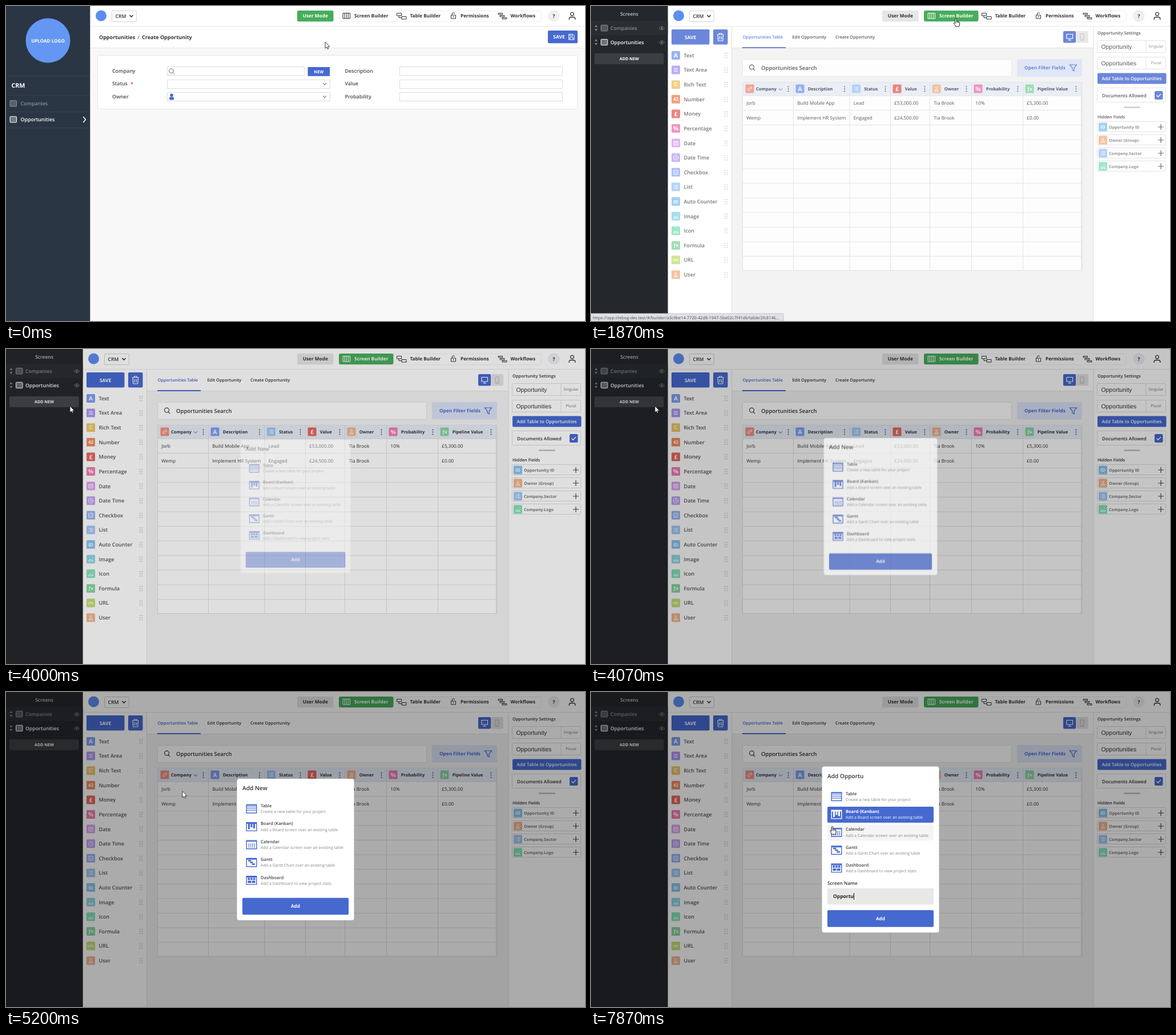
Recreate the animation shown at these times as an HTML page. Size 1014 by 552 pixels, loop 8000 ms.

```html
<!DOCTYPE html>
<html lang="en">
<head>
<meta charset="utf-8">
<title>Screen builder</title>
<style>
html, body { margin: 0; width: 100%; height: 100%; overflow: hidden; background: #f8f8f8; }
svg { display: block; width: 100vw; height: 100vh; }
text { font-family: "Open Sans", "Noto Sans", sans-serif; white-space: pre; text-rendering: geometricPrecision; }
.arial { font-family: "Liberation Sans", Arial, sans-serif; }

.cursor { animation: move 8s ease-in-out infinite; }
.arrow { animation: arrow 8s step-end infinite; }
.hand { animation: hand 8s step-end infinite; }
.grab { animation: grab 8s step-end infinite; }
.nav-hover { animation: nav-hover 8s step-end infinite; }
.status { animation: status 8s linear infinite; }
.builder { animation: builder 8s step-end infinite; }
.work { animation: work 8s ease-out infinite; }
.text-hover { animation: text-hover 8s step-end infinite; }
.add-hover { animation: add-hover 8s linear infinite; }
.dim { animation: dim 8s linear infinite; }
.pick { animation: pick 8s step-end infinite; }
.pop { animation: pop 8s linear infinite; transform-origin: 507px 276px; }
.named { animation: named 8s step-end infinite; }
.board-hover { animation: board-hover 8s step-end infinite; }
.calendar-hover { animation: calendar-hover 8s step-end infinite; }

@keyframes move {
  0%, 2.54% { transform: translate(559px, 63px); }
  13.375%, 27.5% { transform: translate(639px, 22px); }
  35%, 37.5% { transform: translate(203px, 74px); animation-timing-function: linear; }
  38.375% { transform: translate(192.5px, 74.4px); animation-timing-function: ease-out; }
  44.125%, 60% { transform: translate(112px, 100px); }
  69.125%, 78.3% { transform: translate(449px, 226px); }
  80.875%, 100% { transform: translate(422.5px, 235.5px); }
}
@keyframes arrow {
  0% { opacity: 1; } 10.9% { opacity: 0; } 30% { opacity: 1; } 34% { opacity: 0; }
  48.375% { opacity: 1; } 67.1%, 100% { opacity: 0; }
}
@keyframes hand {
  0% { opacity: 0; } 10.9% { opacity: 1; } 30% { opacity: 0; } 41% { opacity: 1; }
  48.375% { opacity: 0; } 67.1%, 100% { opacity: 1; }
}
@keyframes grab { 0% { opacity: 0; } 34% { opacity: 1; } 41%, 100% { opacity: 0; } }
@keyframes nav-hover { 0% { opacity: 0; } 10.9% { opacity: 1; } 20.875%, 100% { opacity: 0; } }
@keyframes status { 0%, 11.2% { opacity: 0; } 12%, 31% { opacity: 1; } 33%, 100% { opacity: 0; } }
@keyframes builder { 0% { opacity: 0; } 20.875%, 100% { opacity: 1; } }
@keyframes work { 0%, 20.8% { opacity: 0; } 25%, 100% { opacity: 1; } }
@keyframes text-hover { 0% { opacity: 0; } 34% { opacity: 1; } 40.8%, 100% { opacity: 0; } }
@keyframes add-hover { 0%, 41% { opacity: 0; } 42.5%, 48.3% { opacity: 1; } 52.5%, 100% { opacity: 0; } }
@keyframes dim { 0%, 47.9% { opacity: 0; } 50% { opacity: .38; } 51.625% { opacity: .94; } 52.5%, 100% { opacity: 1; } }
@keyframes pop {
  0%, 47.9% { opacity: 0; transform: scale(.9); }
  50% { opacity: .38; transform: scale(.938); }
  51.625% { opacity: .95; transform: scale(.994); }
  52.5%, 100% { opacity: 1; transform: scale(1); }
}
@keyframes pick { 0% { opacity: 1; } 76.625%, 100% { opacity: 0; } }
@keyframes named { 0% { opacity: 0; } 76.625%, 100% { opacity: 1; } }
@keyframes board-hover { 0% { opacity: 0; } 67.5%, 100% { opacity: 1; } }
@keyframes calendar-hover { 0% { opacity: 0; } 80%, 100% { opacity: 1; } }
</style>
</head>
<body>
<svg id="stage" viewBox="0 0 1014 552"></svg>
<script>
const BLUE = '#4669d0', GREEN = '#47ad5c', INK = '#333', LINE = '#dcdcdc';

const rect = (x, y, w, h, fill, more = '') =>
  `<rect x="${x}" y="${y}" width="${w}" height="${h}" fill="${fill}" ${more}/>`;
// outlined box, snapped so that its one pixel border stays crisp
const frame = (x, y, w, h, r = 1, stroke = LINE) =>
  rect(Math.floor(x) + .5, Math.floor(y) + .5, Math.round(w), Math.round(h), '#fff', `rx="${r}" stroke="${stroke}"`);
const path = (d, stroke = INK, width = 1, fill = 'none', more = '') =>
  `<path d="${d}" stroke="${stroke}" stroke-width="${width}" fill="${fill}" ${more}/>`;
const dot = (x, y, r, fill) => `<circle cx="${x}" cy="${y}" r="${r}" fill="${fill}"/>`;
// y is the middle of the capitals
const text = (x, y, s, size, weight = 600, fill = INK, more = '') =>
  `<text x="${x}" y="${(y + size * .36).toFixed(2)}" font-size="${size}" font-weight="${weight}" fill="${fill}" ${more}>${s}</text>`;
const mid = 'text-anchor="middle"';
const at = (x, y, body) => `<g transform="translate(${x} ${y})">${body}</g>`;
const group = (cls, body) => `<g class="${cls}">${body}</g>`;
const button = (x, y, w, h, fill = BLUE) => rect(x, y, w, h, fill, 'rx="2"');
const chevron = (x, y, c = INK, w = 1.5) => path(`M${x - 3} ${y - 1.6}l3 3.2l3 -3.2`, c, w);
const lens = (x, y, r, c, w) => path(`M${x + r} ${y}a${r} ${r} 0 1 0 -.01 .1M${x + r * .7} ${y + r * .7}l3 3`, c, w);

/* ---- top bar, shared by both screens ---- */
function topBar(left, dx, building) {
  const tool = building ? '#fff' : INK;
  return rect(left, 0, 1014 - left, 35, '#fff') + rect(left, 35, 1014 - left, 1, '#e6e6e6')
    + dot(166.5 + dx, 17, 9.5, '#5c8df0')
    + frame(185.5 + dx, 8, 43, 19, 2, '#d2d2d2') + text(191.5 + dx, 18, 'CRM', 8.6) + chevron(219.5 + dx, 17.5)
    + rect(510, 8, 63.5, 19.2, building ? '#e6e6e6' : GREEN, 'rx="2.5"')
    + text(541.8, 17.4, 'User Mode', 8.24, 700, building ? INK : '#fff', mid)
    + frame(583, 8, 354, 19, 3, '#efefef')
    + (building ? rect(583, 8, 95.5, 19, GREEN, 'rx="3"') : group('nav-hover', rect(583, 8, 95.5, 19, '#e9e9e9', 'rx="3"')))
    + path('M590 12.5H602.5V22H590ZM593 12.5V22M596.2 12.5V22M599.4 12.5V22', tool)
    + text(610, 17.3, 'Screen Builder', 8.24, 700, tool)
    + path('M684.5 12.5H692.5V17H684.5ZM693 18.5H701V23H693ZM688 17V20.5H693', INK)
    + text(707.5, 17.3, 'Table Builder', 8.24, 700)
    + path('M779.5 16H787.5V22H779.5ZM781.3 16V13.8Q781.3 11.8 783.5 11.8T785.7 13.5M783.5 18V20', INK)
    + text(796, 17.3, 'Permissions', 8.24, 700)
    + path('M862 12.5H869.5V14.8H862ZM865 16.5H873V18.8H865ZM869 20.5H877V22.8H869Z', INK)
    + text(883.5, 17.3, 'Workflows', 8.24, 700)
    + dot(959.5, 17.3, 9.7, '#e1e3ec') + dot(959.5, 17.3, 8.9, '#eff0f6') + text(959.5, 17.4, '?', 9, 700, INK, mid)
    + path('M991.5 11.2a2.9 2.9 0 1 1 -.1 0ZM986.3 24V22.5Q986.3 19.5 989 19.5H994Q996.8 19.5 996.8 22.5V24', INK, 1.3);
}

/* ---- record form ---- */
const screenIcon = (x, y, c, fill) => rect(x, y, 11.5, 10.3, fill, `rx="1" stroke="${c}"`);

function formScreen() {
  const field = (x, y, w) => frame(x, y, w, 15, 0);
  const label = (x, y, s) => text(x, y, s, 8.87, 600, '#484848');
  const rows = [106, 129, 151];
  return rect(147, 0, 867, 552, '#f8f8f8')
    + rect(147, 36, 867, 37, '#fff') + rect(147, 73, 867, 1, '#e4e4e4')
    + topBar(147, 0, false)
    + rect(0, 0, 147.3, 552, '#2b3644')
    + dot(73.5, 60.5, 39, '#6397f3') + text(73.5, 61, 'UPLOAD LOGO', 8.1, 700, '#fff', mid)
    + [122, 156, 185, 213].map(y => rect(0, y, 147, .8, '#3a4553')).join('')
    + text(9.5, 139.5, 'CRM', 10.7, 700, '#fff')
    + screenIcon(7, 165.7, '#8b949e', '#55606d') + text(25.5, 171, 'Companies', 8.87, 600, '#8b949e')
    + screenIcon(7, 193.7, '#fff', '#6f7883') + text(25.5, 199, 'Opportunities', 8.87, 600, '#fff')
    + path('M135.3 194l4.2 5l-4.2 5', '#fff', 1.5)
    + text(163, 54.5, 'Opportunities', 9, 700) + text(230.5, 54.5, '/', 9, 400) + text(238, 54.5, 'Create Opportunity', 9, 700)
    + button(949, 43, 52, 22.3) + text(958.3, 54.3, 'SAVE', 8.5, 700, '#fff')
    + path('M985.5 49.5H993L995 51.5V59H985.5ZM987.5 49.5V52.5H992V49.5M987.5 59V55H993V59', '#fff')
    + frame(160, 86, 840, 94, 1, '#e6e6e6')
    + label(186, 113.8, 'Company') + label(186, 136, 'Status') + label(186, 158.4, 'Owner')
    + text(218, 137, '*', 9, 600, '#d33')
    + field(282, rows[0], 240) + field(282, rows[1], 285) + field(282, rows[2], 285)
    + lens(289.3, 114, 3.8, '#555', .9) + rect(528.5, 107, 38.5, 15.8, BLUE) + text(547.8, 115, 'NEW', 7.3, 700, '#fff', mid)
    + chevron(558, 136.7, '#777', 1.1) + chevron(558, 159, '#777', 1.1)
    + dot(290, 156.3, 2.8, BLUE) + rect(286, 159.6, 8, 5, BLUE, 'rx="1.5"')
    + label(593.5, 113.8, 'Description') + label(593.5, 136, 'Value') + label(593.5, 158.4, 'Probability')
    + rows.map(y => field(689, y, 285)).join('');
}

/* ---- builder ---- */
const BARS = 'M4 5H11M4 7.5H11M4 10H11';
const PERSON = 'M7.5 4a1.6 1.6 0 1 1 -.1 0ZM4.3 11.3Q4.3 8.6 7.5 8.6T10.7 11.3Z';
const PICTURE = 'M3.5 11L6 7.5L8 9.5L9.5 8L11.5 11ZM10 5H11';
const KINDS = {
  'Text': ['#7f9ff0', 'A'], 'Text Area': ['#ae97f4', BARS], 'Rich Text': ['#ecc566', 'M4 4.5H11M4 7H8M4 9.5H11'],
  'Number': ['#f08a5c', '42'], 'Money': ['#e8685e', '£'], 'Percentage': ['#f07bb0', '%'],
  'Date': ['#dba0f0', 'M4 4.5H11V11H4ZM4 6.5H11M6 8.8H9'],
  'Date Time': ['#bfa2f4', 'M7.5 3.5a4 4 0 1 1 -.1 0ZM7.5 5V8H9.5'],
  'Checkbox': ['#98b2f5', 'M4 4H11V11H4ZM5.5 7.5L7 9L9.5 6'],
  'List': ['#a2c8f6', 'M4 5H5M6.2 5H11M4 7.5H5M6.2 7.5H11M4 10H5M6.2 10H11'],
  'Auto Counter': ['#88c6f0', 'ID'], 'Image': ['#8dd6e6', PICTURE], 'Icon': ['#84e3ba', PICTURE],
  'Formula': ['#88d6a2', 'ƒx'], 'URL': ['#c5de74', 'URL'], 'User': ['#f2b48c', PERSON],
  'Link': ['#f0907e', 'M6.5 8.5L9 6M6 6L4 8.5Q4 11 6.5 11L8 9.5M7 5.5L8.5 4Q11 4 11 6.5L9.5 8.5']
};
function chip(x, y, kind) {
  const [colour, mark] = KINDS[kind];
  const size = mark.length > 2 ? 5.5 : mark.length > 1 ? 8 : 10;
  return at(x, y, rect(0, 0, 15, 15, colour, 'rx="1.5"')
    + (mark[0] === 'M' ? path(mark, '#fff') : text(7.5, 7.6, mark, size, 700, '#fff', mid)));
}

function screensBar() {
  const row = (y, name, c, fill) =>
    path(`M6.3 ${y - 1.7}h5.2l-2.6 -3.5ZM6.3 ${y + 1.7}h5.2l-2.6 3.5Z`, 'none', 0, '#85878a')
    + screenIcon(17.5, y - 5, c, fill) + text(34, y + .3, name, 8.7, 600, c)
    + path(`M119.5 ${y + .5}q4.5 -6 9 0q-4.5 6 -9 0Z`, '#85878a', .9) + dot(124, y + .5, 1.4, '#85878a');
  return rect(0, 0, 134.5, 552, '#24272b') + rect(0, 26, 134.5, 25, '#2a2d31')
    + text(67, 14, 'Screens', 8.5, 600, '#c4c5c7', mid)
    + row(38.5, 'Companies', '#8b8d90', '#55585c') + row(63.3, 'Opportunities', '#fff', '#707377')
    + button(6, 83, 121.5, 19, '#3b3e42') + group('add-hover', button(6, 83, 121.5, 19, '#4a4c50'))
    + text(67, 92.7, 'ADD NEW', 7.1, 700, '#fff', mid);
}

function fieldPanel() {
  const names = Object.keys(KINDS).slice(0, 16);
  const grip = y => [0, 1, 2].map(r => dot(234.5, y - 3.6 + r * 3.7, 1.1, '#cfcfcf') + dot(238.3, y - 3.6 + r * 3.7, 1.1, '#cfcfcf')).join('');
  return group('text-hover', rect(135, 74, 111, 25, '#f2f2f2'))
    + button(141, 41, 66.5, 26.5) + text(174, 54.6, 'SAVE', 8.4, 700, '#fff', mid)
    + button(214, 41, 25.5, 26.5)
    + path('M221 50H232.5M224.5 50V48H229V50M222 50.5L222.7 61H230.8L231.5 50.5M225.2 53V58.5M228.3 53V58.5', '#fff', 1.2)
    + names.map((name, i) => {
      const y = 86.5 + i * 25.62;
      return chip(141, y - 7.6, name) + text(162.5, y, name, 9.1, 600, '#555') + grip(y);
    }).join('');
}

function dataTable() {
  const cols = [
    [265.5, 'Link', 'Company', 'Jorb', 'Wemp'],
    [354.5, 'Text', 'Description', 'Build Mobile App', 'Implement HR System'],
    [453, 'List', 'Status', 'Lead', 'Engaged'],
    [524.5, 'Money', 'Value', '£53,000.00', '£24,500.00'],
    [593.5, 'User', 'Owner', 'Tia Brook', 'Tia Brook'],
    [666.5, 'Percentage', 'Probability', '10%', ''],
    [756.5, 'Formula', 'Pipeline Value', '£5,300.00', '£0.00']
  ];
  const ends = [...cols.slice(1).map(c => c[0]), 858.5];
  let out = rect(265.5, 133.5, 594.5, 330, '#fff', `stroke="${LINE}"`) + rect(265.5, 133.5, 594.5, 23.5, '#e6ecf8');
  for (let i = 0; i < 12; i++) out += rect(265.5, 156.7 + i * 25.6, 594.5, .9, LINE);
  cols.forEach(([x, kind, name, first, second], i) => {
    const icon = i ? x + 4 : x + 5, dots = ends[i] - 9;
    out += rect(ends[i] - .4, 133.5, .9, 330, LINE) + chip(icon, 137.6, kind)
      + text(i ? x + 25.2 : 289, 145.6, name, 7.6, 700)
      + [141.5, 145.5, 149.5].map(y => dot(dots, y, 1.1, '#555')).join('')
      + text(x + 6.8, 170.3, first, 8.22, 400) + text(x + 6.8, 196, second, 8.22, 400);
  });
  return out + chevron(332, 146, '#555', 1);
}

function settings() {
  const name = (y, s, hint) => frame(886.5, y, 120, 21, 1) + rect(971.5, y, .9, 21.5, LINE)
    + text(893.5, y + 10.8, s, 10.4, 400, INK, 'class="arial"') + text(989.5, y + 11, hint, 6.9, 400, '#777', mid);
  const hidden = [['Auto Counter', 'Opportunity ID'], ['User', 'Owner (Group)'], ['List', 'Company.Sector'], ['Icon', 'Company.Logo']];
  return text(887, 47, 'Opportunity Settings', 7.5) + name(60, 'Opportunity', 'Singular') + name(89, 'Opportunities', 'Plural')
    + button(887, 117.5, 120.5, 19) + text(947, 127.3, 'Add Table to Opportunities', 8.1, 600, '#fff', mid)
    + frame(886.5, 143.5, 120, 25, 1) + text(895, 156.7, 'Documents Allowed', 8.1)
    + button(987, 149, 14.5, 15) + path('M990.5 156.5l2.7 2.8l4.8 -5.2', '#fff', 1.4)
    + rect(933, 176.3, 29, 2.8, '#c4c4c4', 'rx="1.4"') + text(887, 194, 'Hidden Fields', 7.4)
    + hidden.map(([kind, s], i) => {
      const y = 212 + i * 23;
      return frame(886.5, y - 9.3, 120, 18, 1) + chip(889, y - 7.5, kind) + text(907, y + .3, s, 7.1, 700, '#777')
        + path(`M993 ${y}h10M998 ${y - 5}v10`, '#444', 1.2);
    }).join('');
}

function builderScreen() {
  return rect(134.5, 0, 880, 552, '#f3f3f3') + rect(134.5, 35, 111.5, 517, '#fff')
    + rect(246, 35, 634, 38, '#fff') + rect(246, 73, 634, 1, '#e2e2e2') + rect(880, 35, 134, 517, '#fff')
    + rect(246, 35, 1, 517, '#e2e2e2') + rect(879.5, 35, 1, 517, '#e2e2e2')
    + group('work', fieldPanel()
      + text(265.5, 54.2, 'Opportunities Table', 7.4, 600, BLUE) + rect(265, 72, 76, 2, BLUE)
      + text(352.5, 54.2, 'Edit Opportunity', 7.4) + text(428, 54.2, 'Create Opportunity', 7.4)
      + button(827, 44, 22, 20.5) + rect(849, 44, 22, 20.5, '#e4e4e4', 'rx="2"')
      + path('M833 49.5H843.5V57H833ZM838.2 57V59.5M835.5 60H841', '#fff', 1.2)
      + path('M857 49H863V60H857ZM859 58H861', '#b5b5b5', 1)
      + frame(265.5, 93, 471, 30, 1, '#e4e4e4') + lens(281.5, 107.5, 4, INK, 1.1) + text(298, 108.3, 'Opportunities Search', 9.5)
      + button(746, 93, 114, 30.5, '#dbe2f6') + text(759, 108.3, 'Open Filter Fields', 8.24, 700, BLUE)
      + path('M838.5 103H850.5L846 108.5V114L843 112V108.5Z', BLUE, 1.2)
      + dataTable() + settings())
    + topBar(134.5, -13, true) + screensBar();
}

/* ---- dialog ---- */
const ITEMS = [
  ['Table', 'Create a new table for your project', 'M1 5H18M1 8H18M1 11H18', 1],
  ['Board (Kanban)', 'Add a Board screen over an existing table', 'M5 3V12.5M9.5 3V9M14 3V11', 3],
  ['Calendar', 'Add a Calendar screen over an existing table', 'M4 7.2H16M4 9.8H16M4 12.4H16', 1.6, 'stroke-dasharray="1.7 1.6"'],
  ['Gantt', 'Add a Gantt Chart over an existing table', 'M3.5 5H9M7 8H12M10 11H15.5', 2.3],
  ['Dashboard', 'Add a Dashboard to view project stats', 'M3 5.3H6.5M7.7 5.3H11.3M12.5 5.3H16M3 10.7H9M10.2 10.7H16', 4]
];
function dialog(top, height, [title, titleId], hover, hoverClass, chosen) {
  const row = (i, fill) => rect(414, top + 39.2 + i * 31.35, 186, 28, fill, 'rx="2"');
  return rect(404.5, top, 205, height, '#fff', 'rx="4"')
    + text(414, top + 16.6, title, 10.14, 600, INK, titleId)
    + group(hoverClass, row(hover, '#f5f5f5'))
    + ITEMS.map(([name, about, mark, width, more], i) => {
      const on = i === chosen, y = top + 47.4 + i * 31.35, ink = on ? '#fff' : BLUE;
      return (on ? row(i, BLUE) : '')
        + at(420.5, y - 2.7, path('M.7 .7H18.3V15.3H.7ZM.7 2.2H18.3', ink, 1.4) + path(mark, ink, width, 'none', more))
        + text(446, y, name, 7.6, on ? 700 : 600, on ? '#fff' : '#444') + text(446, y + 10.5, about, 7.04, 400, on ? '#fff' : '#858585');
    }).join('')
    + button(414, top + height - 39.3, 186, 29.5) + text(507, top + height - 24.8, 'Add', 8.24, 700, '#fff', mid);
}

const cursor = group('cursor',
  group('arrow', path('M0 0V11.2L2.6 8.9L4.2 12.4L5.9 11.6L4.4 8.2H7.8Z', '#111', .8, '#fff'))
  + group('hand', path('M-1.2 8.2V1.2Q-1.2 0 0 0T1.2 1.2V5Q2.4 4.4 3 5.4Q4.4 4.9 4.9 6Q6.6 5.7 6.6 7.4V10Q6.6 12 5.4 14H-.2Q-1 12 -3.2 9.4Q-4.2 8 -3.3 7.5Q-2.4 7.2 -1.2 8.6Z', '#111', .9, '#fff')
    + path('M1.2 5V8M3 5.4V8M4.9 6V8', '#111', .6))
  + group('grab', [['#111', 2.8], ['#fff', 1.2]].map(([c, w]) =>
    path('M-2.2 1V-3M-.4 1V-4.2M1.5 1V-4M3.3 1V-2.8M-4.6 0L-1.6 4H2.6L3.3 1H-2Z', c, w, '#fff', 'stroke-linecap="round"')).join('')));

const url = 'https://app.tilebog-dev.test/#/builder/a3c9be14-7720-42d8-1947-5be02c7f41d6/table/2fc8146...';

document.getElementById('stage').innerHTML = formScreen()
  + group('builder', builderScreen())
  + group('status', rect(-1, 539, 338, 14, '#dfe1e5', 'stroke="#c6c8cc"') + text(3, 546, url, 7.35, 400, '#4a4d51'))
  + group('dim', rect(0, 0, 1014, 552, '#000', 'fill-opacity=".33"'))
  + group('pick', group('pop', dialog(152, 248, ['Add New', ''], 1, 'board-hover')))
  + group('named', dialog(130.5, 291, ['', 'id="title"'], 2, 'calendar-hover', 1)
    + text(414, 335, 'Screen Name', 8.24) + rect(414, 344, 186, 28.5, '#e8e8e6', 'rx="2"')
    + text(424, 358.2, '', 8.5, 700, '#222', 'id="entry"') + rect(424, 352, 1, 12, '#111', 'id="caret"'))
  + cursor;

/* ---- typing ---- */
const word = 'Opportu', keys = [7200, 7400, 7470, 7600, 7670, 7800, 7870];
const [title, entry, caret] = ['title', 'entry', 'caret'].map(id => document.getElementById(id));
const start = performance.now();
let shown = -1;

function tick() {
  const t = (performance.now() - start) % 8000;
  const count = keys.filter(k => t >= k).length;
  if (count !== shown) {
    const typed = word.slice(0, count);
    title.textContent = 'Add ' + (typed || 'Board (Kanban)');
    entry.textContent = typed || 'Enter Screen Name...';
    entry.setAttribute('fill', typed ? '#222' : '#707070');
    caret.setAttribute('x', 424 + (typed ? entry.getComputedTextLength() : 0));
    shown = count;
  }
  caret.setAttribute('opacity', t < 6670 || t >= 7200 ? 1 : 0);
  requestAnimationFrame(tick);
}
tick();
</script>
</body>
</html>
```
